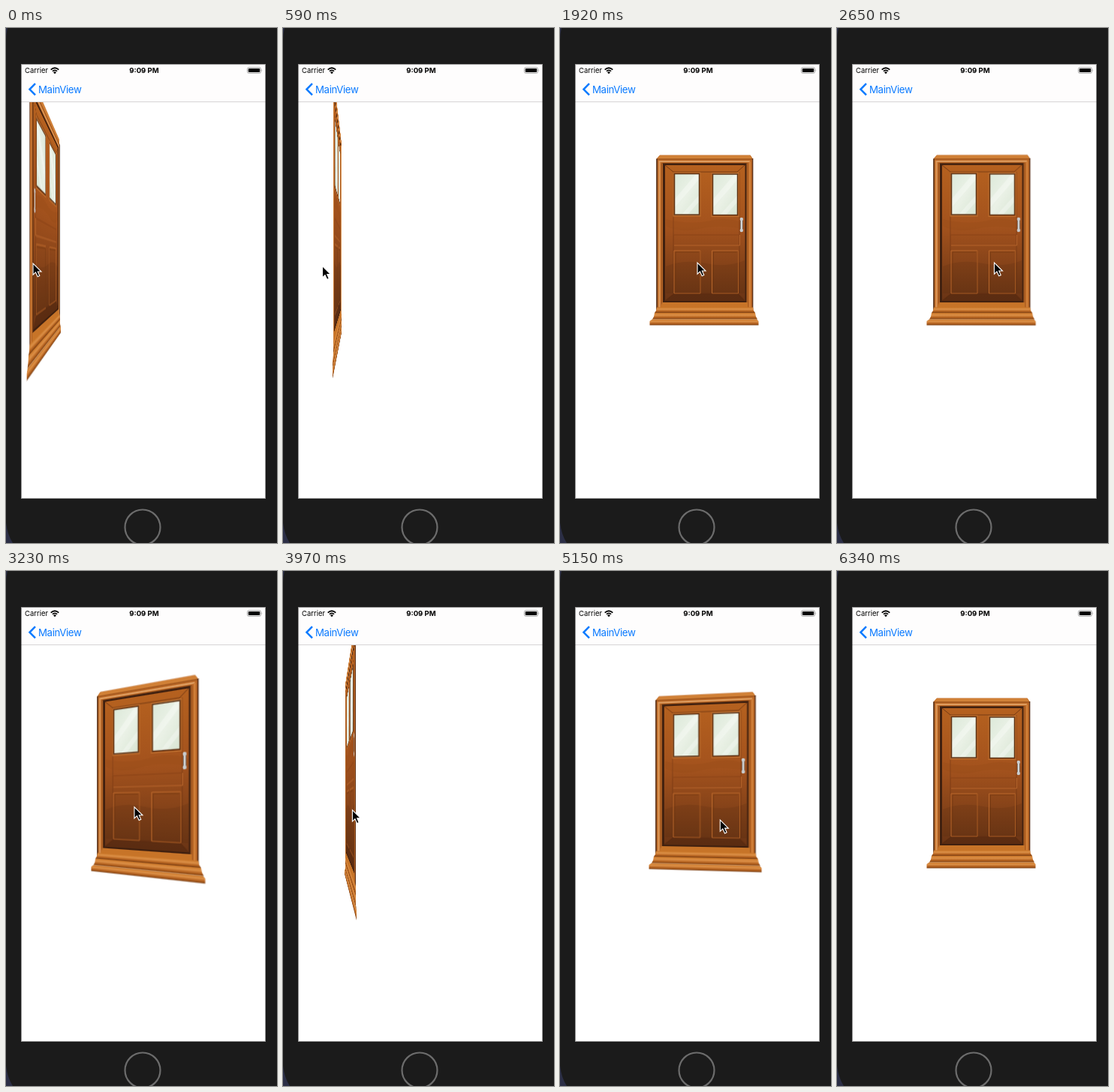
Write an HTML page that moves like this. It is 361x687 px and loops after 6.78 s.

```html
<!DOCTYPE html>
<html lang="en">
<head>
<meta charset="utf-8">
<title>Swinging door</title>
<style>
  html, body { margin: 0; width: 100%; height: 100%; overflow: hidden; background: #2b2e45; }
  #stage { position: relative; width: 361px; height: 687px; overflow: hidden; }
  svg { position: absolute; left: 0; top: 0; display: block; overflow: visible; }
  #screen {
    position: absolute; left: 20px; top: 48px; width: 326px; height: 580px;
    overflow: hidden; background: #fff;
    perspective: 399px; perspective-origin: 154px 262px;
  }
  #door { left: -20px; top: -48px; transform-origin: 80px 310px; }
  text { font-family: Inter, "Liberation Sans", sans-serif; }
</style>
</head>
<body>
<div id="stage">
  <svg width="361" height="687">
    <path d="M2 0Q0 8 0 16V660Q2 676 9 687H361V0Z" fill="#1b1b1b"/>
    <circle cx="182" cy="666" r="23.5" fill="none" stroke="#6c6c6c" stroke-width="2.2"/>
  </svg>

  <div id="screen">
    <svg id="door" width="290" height="420">
      <defs>
        <linearGradient id="wood" x2="0" y2="1">
          <stop offset="0" stop-color="#b5611f"/>
          <stop offset=".45" stop-color="#a3521d"/>
          <stop offset="1" stop-color="#693415"/>
        </linearGradient>
        <linearGradient id="glass" x2="1" y2="1">
          <stop offset="0" stop-color="#dce9d9"/>
          <stop offset=".5" stop-color="#eaf1e6"/>
          <stop offset="1" stop-color="#d8e5d3"/>
        </linearGradient>
        <linearGradient id="step" x2="0" y2="1">
          <stop offset="0" stop-color="#c87527"/>
          <stop offset=".35" stop-color="#dd9148"/>
          <stop offset=".7" stop-color="#b5621f"/>
          <stop offset="1" stop-color="#7c3f13"/>
        </linearGradient>
        <g id="pane">
          <rect x="-1" y="-1" width="36" height="58" fill="none" stroke="#c0702f"/>
          <rect width="34" height="55.5" fill="url(#glass)"/>
          <path d="M1 34L29 1H34V7L1 45ZM10 55L34 28V37L18 55Z" fill="#fff" opacity=".3"/>
          <rect x=".5" y=".5" width="33" height="54.5" fill="none" stroke="#5f3416" stroke-width="1.5"/>
        </g>
        <g id="panel" fill="none">
          <path d="M0 57V0H35" stroke="#b9672a"/>
          <path d="M35 0V57H0" stroke="#a85b22"/>
          <path d="M2 55V2H33" stroke="#70370f" stroke-opacity=".6"/>
        </g>
      </defs>

      <path d="M133 169.500H253.500L257 174.500V377H128.500V174.500Z" fill="#bf6a26"/>
      <path d="M133 170H253.500L256 174H130Z" fill="#d08036"/>
      <path d="M129 175H257" stroke="#94501d"/>
      <path d="M129 174.500V376" stroke="#4b2a17" stroke-width="1.500"/>
      <path d="M132.500 376V178H253" fill="none" stroke="#dd9c5f" stroke-width="2"/>
      <path d="M253 178V376" stroke="#d0803a" stroke-width="2"/>
      <path d="M256.600 174V376" stroke="#5d3118" stroke-width="1.500"/>
      <path d="M135.500 372V180.500H250V372" fill="none" stroke="#94501f"/>
      <rect x="137" y="180.500" width="111.500" height="185.500" fill="#40200f"/>
      <rect x="140" y="183" width="106.500" height="181" fill="url(#wood)"/>
      <g fill="none" stroke="#5c2c10" stroke-opacity=".7">
        <path d="M140 183L151 192H236L246 183"/>
        <path d="M140 364L152 354.500H237L246 364" stroke-width="1.400"/>
        <path d="M151 192V354M239 192V354" stroke-opacity=".4"/>
      </g>
      <path d="M140 364L152 355H237L246 364Z" fill="#4c240f" opacity=".5"/>
      <path d="M141 255Q175 263 200 257T246 261V268Q210 262 185 268T141 264Z" fill="#8c4516" opacity=".2"/>
      <path d="M141 318Q165 308 194 314T246 310V354H141Z" fill="#4f250f" opacity=".16"/>
      <use href="#pane" x="152" y="194"/>
      <use href="#pane" x="203" y="194.500"/>
      <path d="M151.500 290V276H240" fill="none" stroke="#8b4317"/>
      <path d="M152 290H239.500V276" fill="none" stroke="#b4632a"/>
      <use href="#panel" x="152" y="297"/>
      <use href="#panel" x="202.500" y="297"/>
      <path d="M241.800 255V270" stroke="#6f6864" stroke-width="3.600"/>
      <path d="M241.800 255V270" stroke="#dcdfe0" stroke-width="2"/>
      <g fill="#c9cdcf">
        <circle cx="241.800" cy="255" r="2.200"/>
        <circle cx="241.800" cy="270" r="2.200"/>
      </g>
      <path d="M136 366H250V373H134Z" fill="#c77428"/>
      <path d="M129 372.500H257L258 377L260 380H126L128 377Z" fill="url(#step)"/>
      <path d="M126 380H260L261 385L263 388.500H123L125 385Z" fill="url(#step)"/>
      <path d="M123 388.500H262L264.500 391V396.500H119.500V391Z" fill="url(#step)"/>
    </svg>
  </div>

  <svg width="361" height="687">
    <rect x="20" y="48" width="326" height="50" fill="#fefdfd"/>
    <path d="M20 98.500H346" stroke="#d6d4d5"/>
    <rect x="20.500" y="48.500" width="325" height="579" fill="none" stroke="#1b1b1b" stroke-opacity=".45"/>
    <text x="25" y="60.200" font-size="9.500">Carrier</text>
    <text x="184" y="60.200" font-size="9.600" font-weight="700" text-anchor="middle">9:09 PM</text>
    <path d="M59.700 55.600Q65 50.900 70.300 55.600M61.900 57.700Q65 55 68.100 57.700" fill="none" stroke="#000" stroke-width="1.700"/>
    <path d="M63 59.200Q65 57.500 67 59.200L65 61.200Z"/>
    <rect x="321.500" y="52.700" width="18" height="7.600" rx="2" fill="none" stroke="#999" stroke-width=".9"/>
    <rect x="322.800" y="54" width="15.400" height="5" rx=".9"/>
    <path d="M340.700 55.200Q342 56.500 340.700 57.800Z" fill="#999"/>
    <path d="M39 74.200L31.500 81.800L39 89.400" fill="none" stroke="#0a7aff" stroke-width="2.500"/>
    <text x="43" y="86.500" font-size="13.300" letter-spacing="-.4" fill="#0a7aff">MainView</text>
    <path id="cursor" d="M0 0V15.200L3.500 11.900L6.200 17.800L8.800 16.600L6.300 11H11Z" stroke="#fff" stroke-width="1.100"/>
  </svg>
</div>

<script>
const LOOP = 6780, STEP = 147.3, LEAD = 14;
const OPEN = 85.3; // widest door angle, degrees

const door = document.getElementById("door");
const cursor = document.getElementById("cursor");

// Rises smoothly from 0 to 1 between steps a and b.
function ease(n, a, b) {
  const p = Math.min(1, Math.max(0, (n - a) / (b - a)));
  return (1 - Math.cos(Math.PI * p)) / 2;
}

// Three drags: shut, open, shut again; then the pointer leaves.
function pose(n) {
  const pull = ease(n, 17.5, 30);
  const leave = ease(n, 37, 44);
  return {
    angle: OPEN * (1 - ease(n, 2.1, 13) + pull - ease(n, 30.7, 36)),
    x: 36 + 147 * ease(n, 1.5, 13) + 27 * ease(n, 13, 17.5)
      - 136 * pull + 154 * ease(n, 31, 36) + 112 * leave,
    y: 314 + 6 * ease(n, 0, 7) - 7 * ease(n, 7, 13)
      + 8 * ease(n, 17.5, 32) + 13 * ease(n, 32, 36) + 400 * leave
  };
}

const start = performance.now();

function draw() {
  const t = Math.max(0, performance.now() - start) % LOOP;
  const { angle, x, y } = pose(Math.floor((t + LEAD) / STEP));
  door.style.transform = `rotateY(${-angle}deg)`;
  cursor.setAttribute("transform", `translate(${x} ${y})`);
  requestAnimationFrame(draw);
}
draw();
</script>
</body>
</html>
```
